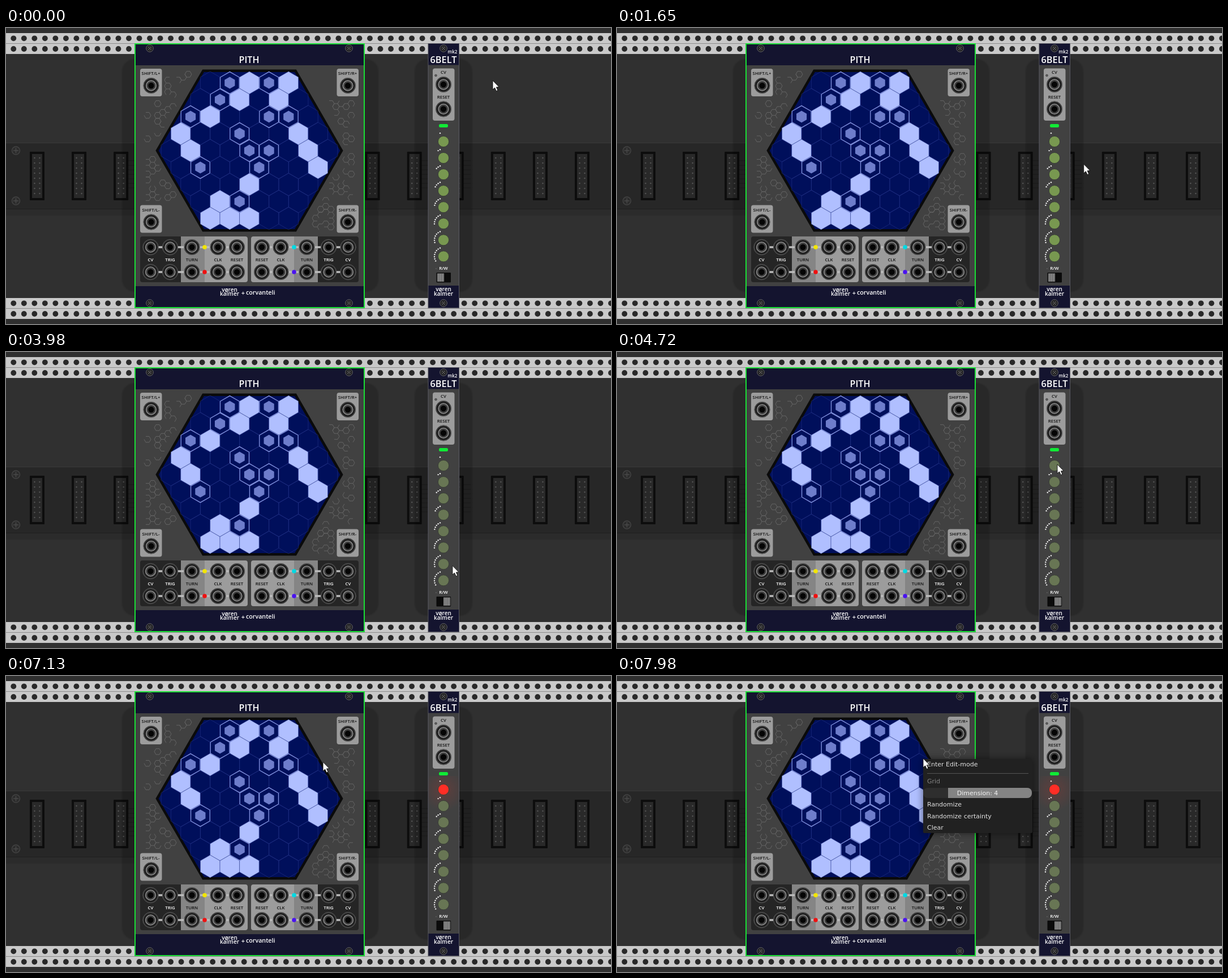
Animation of 1069x524 px, one loop 8000 ms. Source, as an HTML page with a canvas:

```html
<!DOCTYPE html>
<html lang="en">
<head>
<meta charset="utf-8">
<title>Rack modules</title>
<style>
html, body { margin: 0; width: 100%; height: 100%; overflow: hidden; background: #303030; }
canvas { display: block; }
</style>
</head>
<body>
<canvas id="stage" width="1069" height="524"></canvas>
<script>
const W = 1069, H = 524, HP = 18.52, TAU = Math.PI * 2;
const NAVY = '#14142f', PLATE = '#9c9c9c', BODY = '#414141', DARK = '#252525';
const screen = document.getElementById('stage').getContext('2d');
const rack = document.createElement('canvas');
rack.width = W;
rack.height = H;
let c = rack.getContext('2d');

function rect(x, y, w, h, fill, r = 0) {
  c.fillStyle = fill;
  c.beginPath();
  c.roundRect(x, y, w, h, r);
  c.fill();
}
function paint(fill, stroke, width = 1) {
  if (fill) { c.fillStyle = fill; c.fill(); }
  if (stroke) { c.strokeStyle = stroke; c.lineWidth = width; c.stroke(); }
}
function disc(x, y, r, fill, stroke, width) {
  c.beginPath();
  c.arc(x, y, r, 0, TAU);
  paint(fill, stroke, width);
}
function line(x1, y1, x2, y2, color, width = 1) {
  c.beginPath();
  c.moveTo(x1, y1);
  c.lineTo(x2, y2);
  paint(null, color, width);
}
// turn = 0 gives a flat top, turn = 0.5 a pointed one
function hexagon(x, y, r, turn, fill, stroke, width, sides = 6) {
  c.beginPath();
  for (let i = 0; i < Math.min(6, sides + 1); i++) {
    const a = (i + turn) * TAU / 6;
    c.lineTo(x + r * Math.cos(a), y + r * Math.sin(a));
  }
  if (sides == 6) c.closePath();
  paint(fill, stroke, width);
}
function text(s, x, y, size, color = '#fff', align = 'center', weight = 600, face = '"Open Sans", "Noto Sans"') {
  c.font = `${weight} ${size}px ${face}, sans-serif`;
  c.textAlign = align;
  c.fillStyle = color;
  c.fillText(s, x, y);
}
const label = (s, x, y, color) => text(s, x, y, 7.8, color);

function jack(x, y) {
  disc(x, y, 13.7, '#2f2f2f', '#5c5c5c');
  disc(x, y, 11.5, '#191919');
  disc(x, y, 8.8, '#3c3c3c', '#858585', 1.8);
  disc(x, y, 5.2, '#050505');
}
function screw(x, y) {
  disc(x, y, 6.3, '#1e1e20', '#66666a');
  disc(x, y, 3.2, '#111', '#4c4c50');
  line(x - 2.5, y - 2.5, x + 2.5, y + 2.5, '#6c6c6c');
  line(x - 2.5, y + 2.5, x + 2.5, y - 2.5, '#6c6c6c');
}
function brand(x, y) {
  text('vøren', x, y, 10);
  text('kalmer', x, y + 7.5, 10);
}

function drawBackground() {
  rect(0, 0, W, H, '#303030');
  rect(0, 204, W, 117, '#272727');
  rect(0, 321, W, 11, '#2b2b2b');
  line(0, 203.5, W, 203.5, '#383838');
  line(0, 320.5, W, 320.5, '#1f1f1f');
  for (const y of [217, 306]) {
    disc(17.5, y, 7, '#2c2c2c', '#444', 1.4);
    line(13, y, 22, y, '#484848', 1.5);
    line(17.5, y - 4.5, 17.5, y + 4.5, '#484848', 1.5);
  }
  for (const x of [213, 731, 805])
    for (let i = 0; i < 7; i++) line(x, 235 + i * 8, x + 16, 235 + i * 8, '#222', 2);
  for (let x = 55; x < W; x += HP * 4) {
    rect(x - 13, 219, 26, 86, '#0d0d0d', 1);
    rect(x - 9, 223, 18, 78, '#292929');
    for (let i = 0; i < 16; i++)
      disc(x + (i % 2 ? 4.5 : -4.5), 230 + (i >> 1) * 9, 1.2, '#565656');
  }
  c.filter = 'blur(1px)';
  rect(205, 55, 453, 412, 'rgba(0,0,0,.16)', 22);
  rect(722, 55, 102, 412, 'rgba(0,0,0,.16)', 22);
  c.filter = 'none';
  for (const y of [9, 478]) {
    rect(0, y, W, 37, '#c9c9c9');
    line(0, y + 18.5, W, y + 18.5, '#8c8c8c');
    for (let x = 13.3; x < W + 6; x += HP)
      for (const dy of [9.3, 28]) disc(x, y + dy, 4.9, '#292929');
  }
}

// loose honeycomb around the big hexagon, clear of two corners and the jack plates
function drawComb() {
  let seed = 7;
  const random = () => (seed = seed * 16807 % 2147483647) / 2147483647;
  const r = 6, rowStep = r * Math.sqrt(3);
  for (let i = -20; i <= 20; i++)
    for (let j = -13; j <= 13; j++) {
      const dx = i * r * 1.5, dy = (j + (i & 1) / 2) * rowStep;
      const ax = Math.abs(dx), ay = Math.abs(dy);
      const keep = random() < 0.5, sides = 3 + Math.floor(random() * 4);
      const free = ax < 190 && ay < 138 && ax * 0.866 + ay / 2 > 154;
      const blocked = ay > 85 && (dx * dy < 0 || ax > 148);
      if (keep && free && !blocked) hexagon(430 + dx, 217 + dy, r, i % 6, null, '#646464', 1, sides);
    }
}

// f is a full cell, r a ring cell
function drawGrid() {
  const rows = '.rfrf .rf.f. rf..rr. f..r..f. .f..rr.f. .r..r..f ...f... .fr... fff..'.split(' ');
  const r = 20, pitch = r * Math.sqrt(3);
  hexagon(430, 217, 163, 0, '#000f5b', '#0a0a0a', 4.5);
  const each = draw => rows.forEach((row, j) => [...row].forEach((kind, i) =>
    draw(kind, 430 + (i - (row.length - 1) / 2) * pitch, 217 + (j - 4) * r * 1.5)));
  each((kind, x, y) => {
    hexagon(x, y, r, 0.5, kind == 'f' && '#b0bfff', 'rgba(42,58,144,.5)');
  });
  each((kind, x, y) => {
    if (kind != 'r') return;
    hexagon(x, y, r - 0.6, 0.5, null, '#8190dc', 1.3);
    hexagon(x, y, 10.5, 0.5, '#6e7dcb');
  });
}

// one half of the lower panel; side is -1 or 1
function drawPatchbay(side, upper, lower) {
  const at = d => 430 + side * d;
  const span = (near, far, fill, r) => rect(Math.min(at(near), at(far)), 369, far - near, 81, fill, r);
  span(3, 193, DARK, 4);
  span(3, 79, PLATE, side < 0 ? [0, 4, 4, 0] : [4, 0, 0, 4]);
  span(79, 121, '#858585');
  const jacks = { CV: 174.5, TRIG: 140, TURN: 101.5, CLK: 55.5, RESET: 22 };
  for (const [y, color] of [[388, upper], [432, lower]]) {
    line(at(jacks.CV), y, at(jacks.RESET), y, '#bcbcbc', 3.5);
    for (const d of Object.values(jacks)) jack(at(d), y);
    disc(at(79), y, 3.8, color);
  }
  for (const [name, d] of Object.entries(jacks)) label(name, at(d), 413, d > 121 ? '#fff' : '#111');
}

function drawGridModule() {
  rect(228, 28, 405, 467, BODY);
  rect(228, 28, 405, 38, NAVY);
  rect(228, 457, 405, 38, NAVY);
  drawComb();
  drawGrid();
  text('PITH', 429.5, 62, 16);
  for (const x of [254, 606]) for (const y of [36, 487]) screw(x, y);
  for (const [x, side] of [[256, 'L'], [603.5, 'R']])
    for (const [y, sign] of [[72, '+'], [313.5, '-']]) {
      rect(x - 19, y, 38.5, 49, PLATE, 4);
      label(`SHIFT/${side}${sign}`, x, y + 11, '#111');
      jack(x + 0.5, y + 30);
    }
  drawPatchbay(-1, '#f2e600', '#ee1010');
  drawPatchbay(1, '#00d9e2', '#4a12ef');
  brand(395, 466.5);
  text('+', 419, 472.5, 11);
  text('corvanteli', 424, 472, 10.7, '#fff', 'left');
  c.strokeStyle = '#19df35';
  c.lineWidth = 2;
  c.strokeRect(228, 28, 405, 467);
}

const buttonY = i => 201 + i * 29.05;

function drawStrip() {
  rect(745.5, 27, 55.5, 469, '#5a5a64');
  rect(746.5, 28, 53.5, 467, BODY);
  rect(746.5, 28, 53.5, 37.5, NAVY);
  rect(746.5, 456, 53.5, 39, NAVY);
  screw(773, 36);
  screw(773, 487);
  text('mk2', 789, 45, 8);
  text('6BELT', 773, 61.5, 16.3);
  rect(754, 71.5, 38.5, 92.5, PLATE, 4);
  disc(759.5, 84, 1.8, '#606060', '#444');
  label('CV', 773, 81, '#111');
  label('RESET', 773, 125, '#111');
  jack(773, 100);
  jack(773, 143.5);
  rect(765, 170, 16, 6, '#10ea35', 2.5);
  for (let i = 0; i < 8; i++)
    for (let n = 0; n <= i; n++) {
      const a = (-112 - n * 14) * TAU / 360;
      disc(773 + 16 * Math.cos(a), buttonY(i) + 16 * Math.sin(a), 1.2, '#eee');
    }
  disc(760, 426, 1.3, '#555');
  label('R/W', 773, 428, '#fff');
  brand(773, 466);
}

const mix = (a, b, p) => `rgb(${a.map((v, i) => v + (b[i] - v) * p)})`;

function drawControls(dim, red) {
  const lit = [120, 152, 80], dull = [104, 118, 84], armed = [255, 46, 38];
  if (red) {
    const glow = c.createRadialGradient(773, 201, 8, 773, 201, 38);
    glow.addColorStop(0, `rgba(255,50,40,${0.12 * red})`);
    glow.addColorStop(1, 'rgba(255,50,40,0)');
    rect(746.5, 177, 53.5, 62, glow);
  }
  for (let i = 0; i < 8; i++)
    disc(773, buttonY(i), 9.6, i || !red ? mix(lit, dull, dim) : mix(dull, armed, red), '#3a3f36');
  const x = 762 + 11 * dim;
  rect(760.5, 433, 25.5, 17.5, '#0b0b0b', 1);
  rect(x, 434.5, 12, 14.5, '#8c8c8c');
  for (let i = 0; i < 4; i++) line(x + 1.5 + i * 3, 434.5, x + 1.5 + i * 3, 449, '#5a5a5a');
}

function drawMenu() {
  c.save();
  c.shadowColor = 'rgba(0,0,0,.5)';
  c.shadowBlur = 14;
  rect(541, 147, 193, 131, '#212121', 2);
  c.restore();
  const item = (s, y, color = '#e2e2e2', x = 548, align = 'left') =>
    text(s, x, y, 11, color, align, 400, '"DejaVu Sans"');
  item('Enter Edit-mode', 160);
  line(548, 172.5, 727, 172.5, '#555');
  item('Grid', 190, '#858585');
  rect(541, 198, 192, 18, '#2e2e2e', 8);
  rect(585, 198, 148, 18, '#848484', [0, 8, 8, 0]);
  item('Dimension: 4', 211, '#f2f2f2', 637, 'center');
  item('Randomize', 231);
  item('Randomize certainty', 251.5);
  item('Clear', 272);
}

function drawCursor(x, y) {
  c.beginPath();
  for (const [dx, dy] of [[0, 0], [0, 16], [3.6, 12.8], [6.3, 18.6], [9, 17.4], [6.4, 11.8], [11.2, 11.5]])
    c.lineTo(x + dx, y + dy);
  c.closePath();
  paint('#fff', '#111', 0.9);
}

const ramp = (step, from, to) => Math.min(1, Math.max(0, (step - from) / (to - from)));

// each move eases to a point, bowed sideways on the way
const moves = [
  { from: -1, to: 19, x: 777, y: 441 },
  { from: 29, to: 41, x: 778, y: 199, bowX: 16 },
  { from: 57, to: 70, x: 526, y: 145 },
  { from: 70, to: 75, x: 541, y: 146, bowY: -13 }];

function pointer(step) {
  let x = 860, y = 93;
  for (const m of moves) {
    const p = ramp(step, m.from, m.to), eased = p * p * (3 - 2 * p), bow = Math.sin(eased * Math.PI);
    x += (m.x - x) * eased + (m.bowX || 0) * bow;
    y += (m.y - y) * eased + (m.bowY || 0) * bow;
  }
  return [x, y];
}

drawBackground();
drawGridModule();
drawStrip();
c = screen;

function frame(now) {
  const t = now % 8000;
  const step = t < 910 ? -1 : Math.floor((t - 890) / 93);
  c.drawImage(rack, 0, 0);
  drawControls(ramp(step, 22, 24), ramp(step, 50, 53));
  if (t >= 7970) drawMenu();
  drawCursor(...pointer(step));
  requestAnimationFrame(frame);
}
requestAnimationFrame(frame);
</script>
</body>
</html>
```
